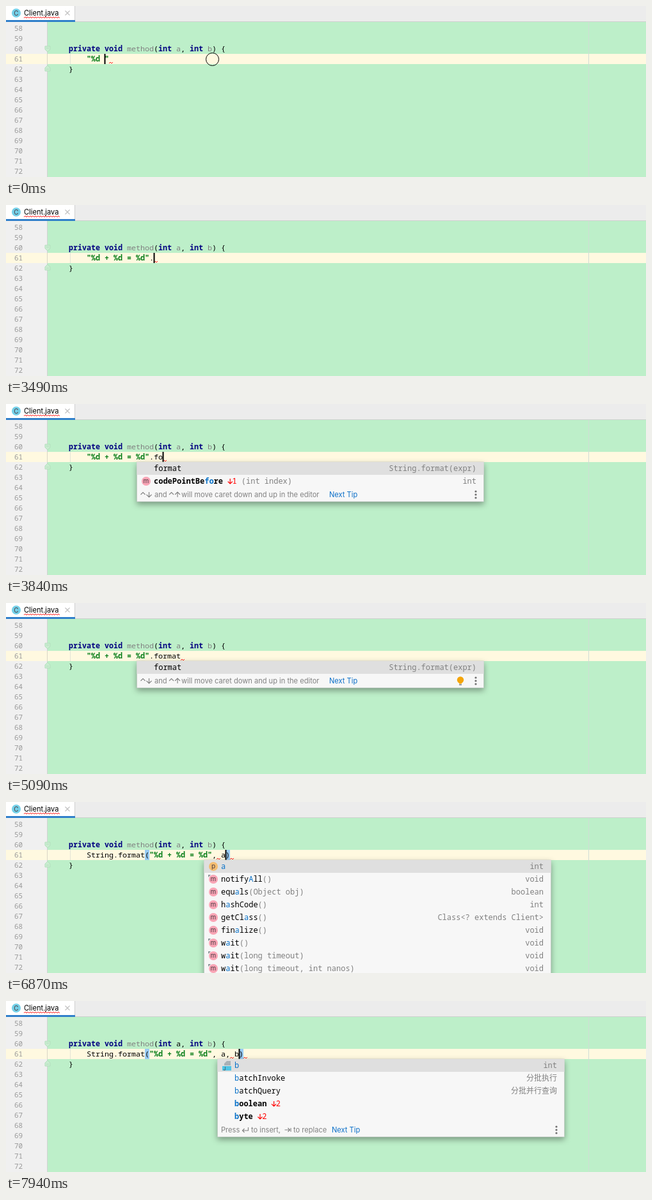
Animation, 1000 px wide and 268 px high, one loop 8 s. Source, as an HTML page:

```html
<!DOCTYPE html>
<html lang="en">
<head>
<meta charset="utf-8">
<title>Editor completion</title>
<style>
html, body { margin: 0; width: 100%; height: 100%; overflow: hidden; }
svg { display: block; width: 1000px; height: 268px; }
text { white-space: pre; font: 12px "Noto Sans Mono", monospace; fill: #000; }
.code { font-size: 11.667px; }
.num { font-size: 11px; fill: #999; }
.ui { font: 11.1px Inter, sans-serif; }
.cjk { font: 12px "Noto Sans CJK SC", "Noto Sans CJK", sans-serif; }
.gray { fill: #808080; }
.key { fill: #000080; font-weight: 700; }
.str { fill: #067d17; font-weight: 700; }
.hit { fill: #0a72c8; }
.bold { font-weight: 700; }
.red { fill: #f00; }
.link { fill: #0b6fc8; }
.icon { font: 10px Inter, sans-serif; text-anchor: middle; fill: #4a3a40; }
.end { text-anchor: end; }
.line { fill: none; stroke: #808080; stroke-width: 1.1; }
.wave { fill: none; stroke: #f22; stroke-width: 1; }
.popup { filter: drop-shadow(0 4px 5px rgba(0, 0, 0, .36)); }
</style>
</head>
<body>
<svg id="stage" viewBox="0 0 1000 268">
  <g id="editor"></g>
  <g id="live"></g>
</svg>
<script>
const LOOP = 8000, CHAR = 7, ROW = 20, LEFT = 126, BASE = 87;
const FORMAT = '%d + %d = %d';
const editor = document.getElementById('editor');
const live = document.getElementById('live');

const esc = s => s.replace(/&/g, '&amp;').replace(/</g, '&lt;');
const text = (x, y, s, cls) => `<text x="${x}" y="${y}" class="${cls}">${esc(s)}</text>`;
const span = (s, cls = '') => `<tspan class="${cls}">${esc(s)}</tspan>`;
const rect = (x, y, w, h, fill) => `<rect x="${x}" y="${y}" width="${w}" height="${h}" fill="${fill}"/>`;
const path = (d, cls = 'line') => `<path d="${d}" class="${cls}"/>`;
const dot = (x, y, r, fill) => `<circle cx="${x}" cy="${y}" r="${r}" fill="${fill}"/>`;

function wave(x, y, w) {
  let d = `M${x} ${y + 2}`;
  for (let i = 2; i <= w; i += 2) d += `L${x + i} ${y + (i % 4 ? 0 : 2)}`;
  return path(d, 'wave');
}

// Lays out [text, class] pieces on the monospaced grid.
function code(x, y, pieces) {
  return pieces.map(([s, cls = '']) => {
    const out = text(x, y, s, 'code ' + cls);
    x += s.length * CHAR;
    return out;
  }).join('');
}

function drawEditor() {
  let out = rect(0, 0, 1000, 268, '#bdefc9') + rect(0, 25, 64, 243, '#f0f0f0')
    + rect(64, 25, 1, 243, '#d2d2d2') + rect(0, 75, 1000, 16, '#fff9e0')
    + rect(64, 75, 1, 16, '#d9d6c6') + rect(910, 25, 1, 243, '#cfdcd5')
    + rect(100, 75, 1, 16, '#e3e3d6')
    + rect(0, 0, 1000, 24, '#ececec') + rect(0, 24, 1000, 1, '#d0d0d0')
    + rect(0, 0, 107, 24, '#fff') + rect(107, 0, 1, 24, '#d0d0d0')
    + rect(0, 22, 108, 3, '#2f7fca')
    + dot(16, 11, 7, '#74d0e8') + text(16, 14.6, 'C', 'icon')
    + text(28, 15, 'Client.java', 'ui') + wave(28, 17, 56)
    + path('M92.5 7.5l7 7m0-7l-7 7" stroke-opacity=".5');
  for (let n = 58; n <= 72; n++) out += text(13, 39 + (n - 58) * 16, String(n), 'num');
  for (const [y, flip] of [[67, 1], [98, -1]])
    out += `<path transform="translate(65 ${y}) scale(1 ${flip})" d="M-4-4H4V1L0 5L-4 1ZM-2-1H2" fill="#c9ecd0" stroke="#b3dfbd"/>`;
  out += code(98, 103, [['}']]);
  editor.innerHTML = out;
}

const signature = aUsed => code(98, 71, [
  ['private void ', 'key'], ['method', 'gray'], ['('], ['int ', 'key'],
  ['a', aUsed ? '' : 'gray'], [', '], ['int ', 'key'], ['b', 'gray'], [') {']
]);

function letterIcon(x, y, letter, pinned) {
  return dot(x, y, 7, letter === 'p' ? '#f4bd72' : '#f9a4b5')
    + text(x, y + 3.3, letter, 'icon')
    + (pinned ? `<path d="M${x - 8} ${y - 3}v-4h4z" fill="#8b9297"/>` : '');
}

function fileIcon(x, y) {
  return `<path d="M${x - 4} ${y}v-3l4-4h6v7z" fill="#a8b0b6"/>`
    + rect(x - 7, y + 1, 14, 7, '#4fc5e6')
    + `<text x="${x - 3.5}" y="${y + 7.5}" class="icon" style="font-size:7px">J</text>`;
}

const arrow = (x, y, dir) => path(`M${x} ${y - 4}v8m-3.5-${dir > 0 ? 3.5 : 4.5}l3.5 3.5l3.5-3.5`);
function hintArrow(x, y, up) {
  return path(`M${x} ${y}l3.5-3.5l3.5 3.5`)
    + path(up ? `M${x + 13} ${y + 4}v-8m-4 4l4-4l4 4` : `M${x + 13} ${y - 4}v8m-4-4l4 4l4-4`);
}

function label(x, y, { name, hit = '', args = '', bold, rank }) {
  const at = hit ? name.indexOf(hit) : 0;
  const weight = bold ? 'bold ' : '';
  const parts = [[name.slice(0, at), weight], [hit, weight + 'hit'], [name.slice(at + hit.length), weight]];
  let out = `<text x="${x}" y="${y + 4}">` + parts.map(p => span(...p)).join('') + '</text>';
  let after = x + (name.length + (rank ? 1 : 0)) * 7.2;
  if (rank) {
    out += `<path d="M${after + 4} ${y - 4}v8m-3.5-3.5l3.5 3.5l3.5-3.5" fill="none" stroke="#f00" stroke-width="1.2"/>`
      + text(after + 7.2, y + 4, String(rank), 'red');
    after += 3 * 7.2;
  }
  return out + text(after, y + 4, args, 'gray');
}

function moveHint(x, y) {
  return hintArrow(x + 6, y, false) + text(x + 27.5, y + 4, 'and', 'ui gray')
    + hintArrow(x + 50.5, y, true)
    + text(x + 69.5, y + 4, 'will move caret down and up in the editor', 'ui gray')
    + text(x + 300.5, y + 4, 'Next Tip', 'ui link');
}

function insertHint(x, y) {
  return text(x + 5.5, y + 4, 'Press', 'ui gray')
    + path(`M${x + 48} ${y - 4}v5h-9m3-3l-3 3l3 3`)
    + text(x + 52.5, y + 4, 'to insert,', 'ui gray')
    + path(`M${x + 105} ${y}h8m-3-3l3 3l-3 3m4.5-6v6`)
    + text(x + 118.5, y + 4, 'to replace', 'ui gray')
    + text(x + 178.5, y + 4, 'Next Tip', 'ui link');
}

function popup(x, items, hint, bulb) {
  const height = items.length * ROW + 22, foot = 91 + items.length * ROW + 11;
  let out = `<rect x="${x}" y="91" width="542" height="${height}" fill="#f7f7f7" stroke="#bcc4be" stroke-width=".6" class="popup"/>`
    + rect(x, 91, 542, ROW, '#dfdfdf');
  items.forEach((item, i) => {
    const y = 101 + i * ROW;
    if (item.icon === 'file') out += fileIcon(x + 14.5, y);
    else if (item.icon) out += letterIcon(x + 14.5, y, item.icon, item.pinned);
    out += label(x + 26.5, y, item);
    out += text(x + 530.5, y + 4, item.type || '', 'gray end' + (item.cjk ? ' cjk' : ''));
  });
  out += hint(x, foot);
  for (const dy of [-5, 0, 5]) out += dot(x + 529.5, foot + dy, 1.6, '#6e6e6e');
  if (bulb) out += dot(x + 505.5, foot - 1.5, 5.2, '#f4a50a') + rect(x + 503.5, foot + 3, 4, 1.6, '#f4a50a') + rect(x + 503.5, foot + 5.4, 4, 1.4, '#777');
  return out;
}

const method = (name, hit, args, type, extra) => ({ icon: 'm', name, hit, args, type, ...extra });
const formatItem = { name: 'format', type: 'String.format(expr)' };
const before = hit => method('codePointBefore', hit, '(int index)', 'int', { bold: true, rank: 1 });
const bold = { bold: true };
const fItems = [
  formatItem,
  method('format', 'f', '(String format, Object... args)', 'String', bold),
  method('indexOf', 'f', '(int ch)', 'int', bold),
  method('indexOf', 'f', '(String str)', 'int', bold),
  method('lastIndexOf', 'f', '(int ch)', 'int', bold),
  method('lastIndexOf', 'f', '(String str)', 'int', bold),
  before('f'),
  method('offsetByCodePoints', 'f', '(int index, int offset)', 'int', bold),
  method('finalize', 'f', '()', 'void')
];
const pinned = { pinned: true };
const aItems = [
  { icon: 'p', name: 'a', hit: 'a', type: 'int' },
  method('notifyAll', 'A', '()', 'void', pinned),
  method('equals', 'a', '(Object obj)', 'boolean'),
  method('hashCode', 'a', '()', 'int'),
  method('getClass', 'a', '()', 'Class<? extends Client>'),
  method('finalize', 'a', '()', 'void'),
  method('wait', 'a', '()', 'void', pinned),
  method('wait', 'a', '(long timeout)', 'void', pinned),
  method('wait', 'a', '(long timeout, int nanos)', 'void', pinned)
];
const bItems = [
  { icon: 'file', name: 'b', hit: 'b', type: 'int' },
  { name: 'batchInvoke', hit: 'b', type: '分批执行', cjk: true },
  { name: 'batchQuery', hit: 'b', type: '分批并行查询', cjk: true },
  { name: 'boolean', hit: 'b', bold: true, rank: 2 },
  { name: 'byte', hit: 'b', bold: true, rank: 2 }
];

// Key press times; each adds one character.
const formatKeys = [350, 440, 1160, 1340, 1690, 1870, 2050, 2680, 2860];
const tailKeys = [3490, 3570, 3750, 3930, 4010, 4190, 4550];
const argKeys = [6600, 7410, 7500, 7770];
const pressed = (keys, t) => keys.filter(k => k <= t).length;
const within = (t, from, to) => t >= from && t < to;

const caret = x => rect(x - .5, 75, 2, 16, '#000');

function typing(t) {
  const quoted = `"${FORMAT.slice(0, 3 + pressed(formatKeys, t))}"`;
  const tail = '.format'.slice(0, pressed(tailKeys, t));
  const end = LEFT + (quoted.length + tail.length) * CHAR;
  let out = code(LEFT, BASE, [[quoted, 'str'], [tail]]) + wave(end, 88, 6);
  if (!within(t, 5090, 5630) && t < 6070) out += caret(t < 3130 ? end - CHAR : end);
  if (t < 80) out += '<circle cx="322.5" cy="83.5" r="10" fill="none" stroke="#000"/>';
  if (within(t, 3660, 3840)) out += popup(204.5, fItems, moveHint);
  else if (within(t, 3840, 4010)) out += popup(204.5, [formatItem, before(t < 3930 ? 'fo' : 'for')], moveHint);
  else if (t >= 4010) out += popup(204.5, [formatItem], moveHint, t >= 5090);
  return out;
}

function calling(t) {
  const args = 'a, b'.slice(0, pressed(argKeys, t));
  const argX = LEFT + 30 * CHAR, end = argX + args.length * CHAR;
  let out = '';
  if (t >= 6340) {
    out += rect(217, 75, CHAR, 16, '#99ccf5') + rect(end, 75, CHAR, 16, '#99ccf5');
  }
  out += code(LEFT, BASE, [['String.format('], [`"${FORMAT}"`, 'str'], [', ' + args + ')']]);
  if (t >= 6340) out += wave(args.length > 2 ? argX + 14 : argX - 7, 88, 6) + wave(end + CHAR, 88, 6);
  out += caret(end);
  if (within(t, 6780, 7410)) out += popup(309.5, aItems, insertHint);
  if (t >= 7940) out += popup(330.5, bItems, insertHint);
  return out;
}

let shown = '';
function draw(t) {
  const next = signature(t >= 7860) + (t < 6250 ? typing(t) : calling(t));
  if (next !== shown) live.innerHTML = shown = next;
}

function tick() {
  draw(performance.now() % LOOP);
  requestAnimationFrame(tick);
}

drawEditor();
tick();
</script>
</body>
</html>
```
